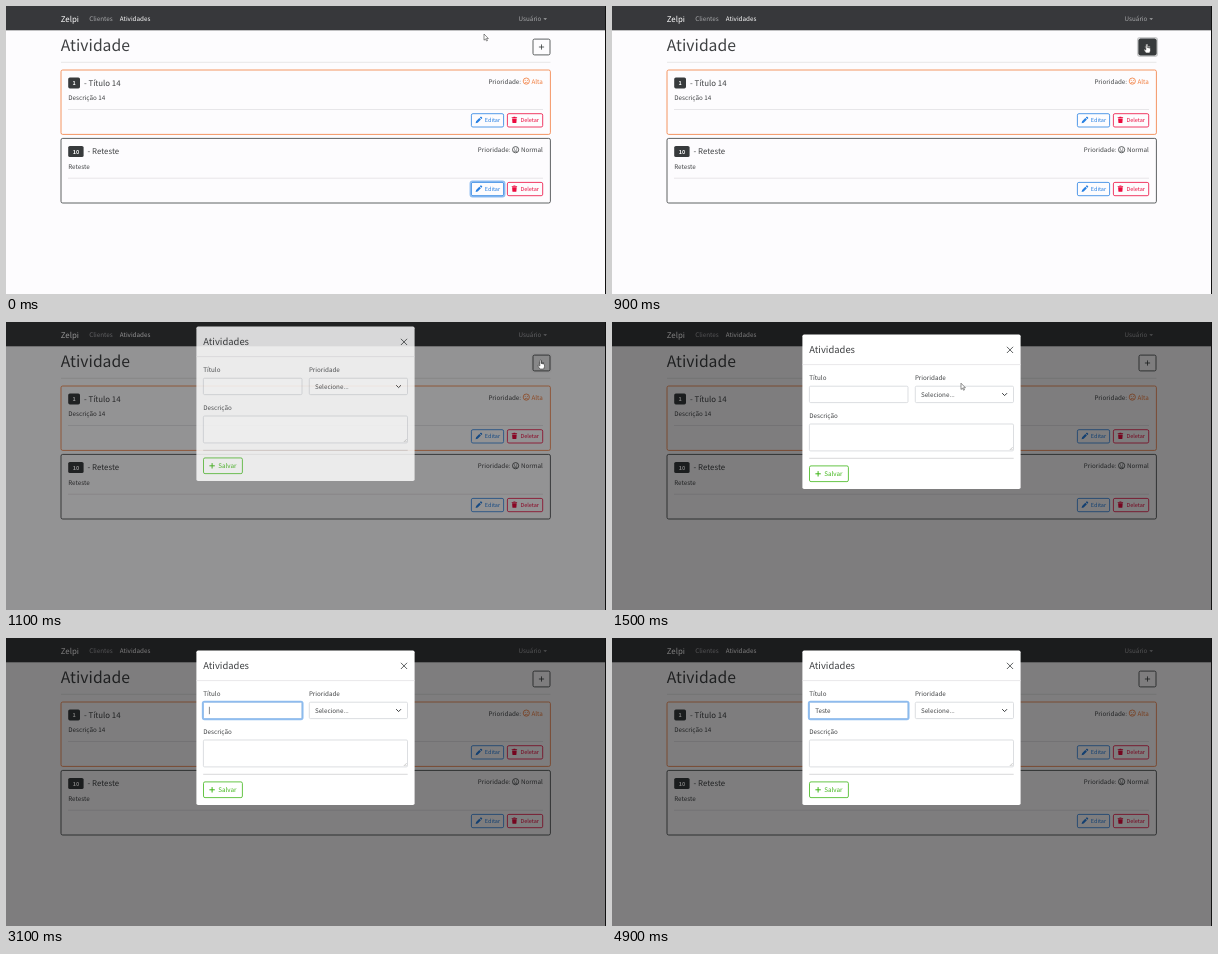
An HTML page for the animation above (5 s loop, 600 px wide and 288 px high).

```html
<!DOCTYPE html>
<html lang="pt-BR">
<head>
<meta charset="utf-8">
<title>Atividades</title>
<style>
html, body { margin: 0; width: 100%; height: 100%; overflow: hidden; background: #fdfcfe; }
svg { display: block; width: 600px; height: 288px; }
text { font: 6.29px "Noto Sans CJK JP", "Noto Sans CJK SC", "Noto Sans", sans-serif; fill: #3f4143; text-rendering: geometricPrecision; white-space: pre; }
.small { font-size: 5.5px; }
.h5 { font-size: 7.86px; }
.h4 { font-size: 9.43px; }
.h1 { font-size: 15.73px; }
.bold { font-weight: 700; }
.medium { font-weight: 500; }
.white { fill: #fff; }
.muted { fill: #a7a8aa; }
.line { fill: none; stroke: currentColor; stroke-width: .8; }
.fill, .ink { fill: currentColor; }
.rule { stroke: #e2e1e4; stroke-width: .8; }
.field { fill: #fff; stroke: #cdd0d4; stroke-width: .7; }
.dark { color: #373a3c; }
.blue { color: #2780e3; }
.red { color: #ec0a3e; }
.green { color: #3fb618; }
.orange { color: #f17c3c; }
.ring { fill: none; stroke: #2780e3; stroke-opacity: .5; stroke-width: 1.7; }
</style>
</head>
<body>
<svg viewBox="0 0 600 288">
  <defs>
    <g id="actions">
      <path class="rule" d="M62 103.5H537"/>
      <g class="blue">
        <rect class="line" x="465.4" y="107.7" width="32.2" height="13.3" rx="1.5"/>
        <path class="fill" d="M469.6 117.2l.5-2 3.2-3.2 1.6 1.6-3.2 3.2zM473.8 111.5l.7-.7q.4-.3.8 0l.8.8q.3.4 0 .8l-.7.7z"/>
        <text class="small ink" x="478.8" y="116.3">Editar</text>
      </g>
      <g class="red">
        <rect class="line" x="501.4" y="107.7" width="35.3" height="13.3" rx="1.5"/>
        <path class="fill" d="M505.7 111.2h1.5l.4-.5h1.6l.4.5h1.5v.8h-5.4zM506.1 112.5h4.6l-.3 4q0 .6-.6.6h-2.8q-.6 0-.6-.6z"/>
        <text class="small ink" x="514.4" y="116.3">Deletar</text>
      </g>
    </g>
    <g id="face">
      <circle class="line" r="3.1"/>
      <circle class="fill" cx="-1.1" cy="-.8" r=".5"/>
      <circle class="fill" cx="1.1" cy="-.8" r=".5"/>
    </g>
  </defs>

  <rect width="600" height="288" fill="#fdfcfe"/>
  <rect width="600" height="24.3" fill="#37383b"/>
  <text class="h5 white medium" x="54.8" y="15.6">Zelpi</text>
  <text class="muted" x="83.2" y="15.2">Clientes</text>
  <text class="white medium" x="113.8" y="15.2">Atividades</text>
  <text class="muted" x="512.6" y="15.2">Usuário</text>
  <path class="muted" d="M537.4 12.2h3.6l-1.8 1.8z"/>

  <text class="h1" x="54.8" y="45">Atividade</text>
  <path class="rule" d="M55 56.3H544.5"/>
  <g class="dark">
    <rect class="line" x="527" y="33.1" width="17" height="15.8" rx="1.5"/>
    <path class="line" d="M532.9 41h5.2M535.5 38.4v5.2"/>
  </g>
  <g id="hover">
    <rect x="526.6" y="32.7" width="17.8" height="16.6" rx="1.7" fill="#373a3c"/>
    <path class="line" color="#fff" d="M532.9 41h5.2M535.5 38.4v5.2"/>
  </g>
  <rect id="plusRing" class="ring" x="525.8" y="31.9" width="19.4" height="18.2" rx="2.3" style="stroke:#373a3c"/>

  <g class="orange">
    <rect class="line" x="55" y="64" width="489.4" height="64.4" rx="1.7"/>
    <use href="#face" x="520.3" y="75.1"/>
    <path class="line" d="M518.8 77q1.5-1.5 3 0"/>
    <text class="ink" x="525.5" y="77.7">Alta</text>
  </g>
  <rect x="62.2" y="71.4" width="11.8" height="11" rx="1.7" fill="#373a3c"/>
  <text class="bold white small" x="68.1" y="79" text-anchor="middle">1</text>
  <text class="h5" x="78" y="79.8">- Título 14</text>
  <text x="482.4" y="77.7">Prioridade:</text>
  <text x="62.2" y="94">Descrição 14</text>
  <use href="#actions"/>

  <g class="dark">
    <rect class="line" x="55" y="132.4" width="489.4" height="64.6" rx="1.7"/>
    <use href="#face" x="509.6" y="143.7"/>
    <path class="line" d="M508.2 145.1h2.8"/>
    <rect class="fill" x="62.2" y="139.9" width="15.4" height="11.2" rx="1.7"/>
  </g>
  <text class="bold white small" x="69.9" y="147.6" text-anchor="middle">10</text>
  <text class="h5" x="81.6" y="148.4">- Reteste</text>
  <text x="471.8" y="146.2">Prioridade:</text>
  <text x="514.9" y="146.2">Normal</text>
  <text x="62.2" y="162.7">Reteste</text>
  <use href="#actions" y="68.7"/>
  <rect id="editRing" class="ring" x="464.4" y="175.4" width="34.2" height="15.3" rx="2.2"/>

  <rect id="backdrop" width="600" height="288"/>

  <g id="modal">
    <rect id="panel" x="190.4" y="12.6" width="218.2" height="154.3" rx="1.7"/>
    <text class="h4" x="197.2" y="31.4">Atividades</text>
    <path class="line dark" d="M394.9 24.8l6.2 6.2M401.1 24.8l-6.2 6.2"/>
    <path class="rule" d="M190.4 42.6H408.6"/>
    <text x="197.2" y="58">Título</text>
    <text x="302.9" y="58">Prioridade</text>
    <rect class="field" x="197.4" y="64.2" width="98.6" height="16.4" rx="1.2"/>
    <g id="focus">
      <rect class="ring" x="196.7" y="63.5" width="100" height="17.8" rx="1.8"/>
      <rect class="line" color="#93c0f1" x="197.4" y="64.2" width="98.6" height="16.4" rx="1.2"/>
    </g>
    <text id="typed" x="203.2" y="74.8"></text>
    <path id="caret" class="line dark" d="M0 68.8v7.4" style="stroke-width:.6"/>
    <rect class="field" x="303.3" y="64.2" width="98.2" height="16.4" rx="1.2"/>
    <text x="308.9" y="74.8">Selecione...</text>
    <path class="line dark" d="M390.2 71.2l2.4 2.4 2.4-2.4" style="stroke-width:1"/>
    <text x="197.2" y="95.7">Descrição</text>
    <rect class="field" x="197.4" y="102" width="204.1" height="26.9" rx="1.2"/>
    <path class="line" color="#999" d="M397.8 128l2.8-2.8M399.5 128l1.1-1.1" style="stroke-width:.5"/>
    <path class="rule" d="M197.2 136.3H401.7" style="stroke:#cfced1"/>
    <g class="green">
      <rect class="line" x="197.5" y="143.9" width="38.9" height="15.7" rx="1.5"/>
      <path class="line" d="M203.4 151.8h5.4M206.1 149.1v5.4" style="stroke-width:1"/>
      <text class="ink" x="212.2" y="154.4">Salvar</text>
    </g>
  </g>

  <g id="pointer" stroke-width=".6" stroke-linejoin="round">
    <path id="arrow" fill="#fff" stroke="#444" d="M0 0V6.2L1.5 4.9 2.5 7 3.5 6.6 2.5 4.5H4.4Z"/>
    <path id="hand" fill="#fff" stroke="#333" d="M-.7 .6Q0-.4 .7 .6V3.4L3.3 4Q4 4.2 4 5V6.6L3.2 9H-.6L-2.6 5.9Q-2.5 4.9-1.6 5.3L-.7 6.1Z"/>
    <path id="beam" fill="none" stroke="#444" d="M-1.2-3.4H1.2M0-3.4V3.4M-1.2 3.4H1.2"/>
  </g>
  <rect x="599" width="1" height="288" fill="#111"/>
</svg>
<script>
const LOOP = 5000;
const OPEN = 965;
const FOCUS = 1900;
const KEYS = [3150, 3300, 3500, 3650, 3980];
const el = Object.fromEntries([...document.querySelectorAll('svg > [id], #modal [id], #pointer [id]')].map(e => [e.id, e]));

const ramp = (t, start, length) => Math.min(1, Math.max(0, (t - start) / length));
const smooth = x => x * x * (3 - 2 * x);
const lerp = (a, b, k) => a + (b - a) * k;
const alpha = (name, value) => el[name].setAttribute('opacity', value);

function drawPage(t) {
  const closing = 1 - ramp(t, OPEN, 150);
  alpha('hover', ramp(t, 430, 150) * closing);
  alpha('plusRing', .5 * ramp(t, 500, 150) * closing);
  alpha('editRing', 1 - ramp(t, 500, 150));
}

function drawModal(t) {
  const shown = ramp(t, OPEN + 10, 150);
  const slide = 1 - (1 - ramp(t, OPEN, 300)) ** 1.68;
  const grey = 255 - 110 * (1 - shown) ** 2;
  alpha('backdrop', shown / 2);
  alpha('modal', shown);
  el.panel.setAttribute('fill', `rgb(${grey},${grey},${grey})`);
  el.modal.setAttribute('transform', `translate(0 ${-22 * (1 - slide)})`);
  alpha('focus', ramp(t, FOCUS, 150));
}

function drawTyping(t) {
  const count = KEYS.filter(k => t >= k).length;
  const since = t - (count ? KEYS[count - 1] : FOCUS + 50);
  el.typed.textContent = 'Teste'.slice(0, count);
  const x = 203.4 + (count ? el.typed.getComputedTextLength() : 0);
  el.caret.setAttribute('transform', `translate(${x} 0)`);
  alpha('caret', since >= 0 && since % 1000 < 500 ? 1 : 0);
}

function drawPointer(t) {
  const go = smooth(ramp(t, 50, 450));
  const back = smooth(ramp(t, 1110, 640));
  const x = lerp(lerp(478, 534.5, go), 255, back);
  const y = lerp(lerp(28, 38, go), 73, back);
  const shape = x > 527 && back < .01 ? 'hand' : x < 296 ? 'beam' : 'arrow';
  for (const name of ['arrow', 'hand', 'beam']) alpha(name, name === shape ? 1 : 0);
  alpha('pointer', t < FOCUS + 100 ? 1 : 0);
  el.pointer.setAttribute('transform', `translate(${x} ${y})`);
}

const start = performance.now();
function frame() {
  const t = (performance.now() - start) % LOOP;
  drawPage(t);
  drawModal(t);
  drawTyping(t);
  drawPointer(t);
  requestAnimationFrame(frame);
}
frame();
</script>
</body>
</html>
```
